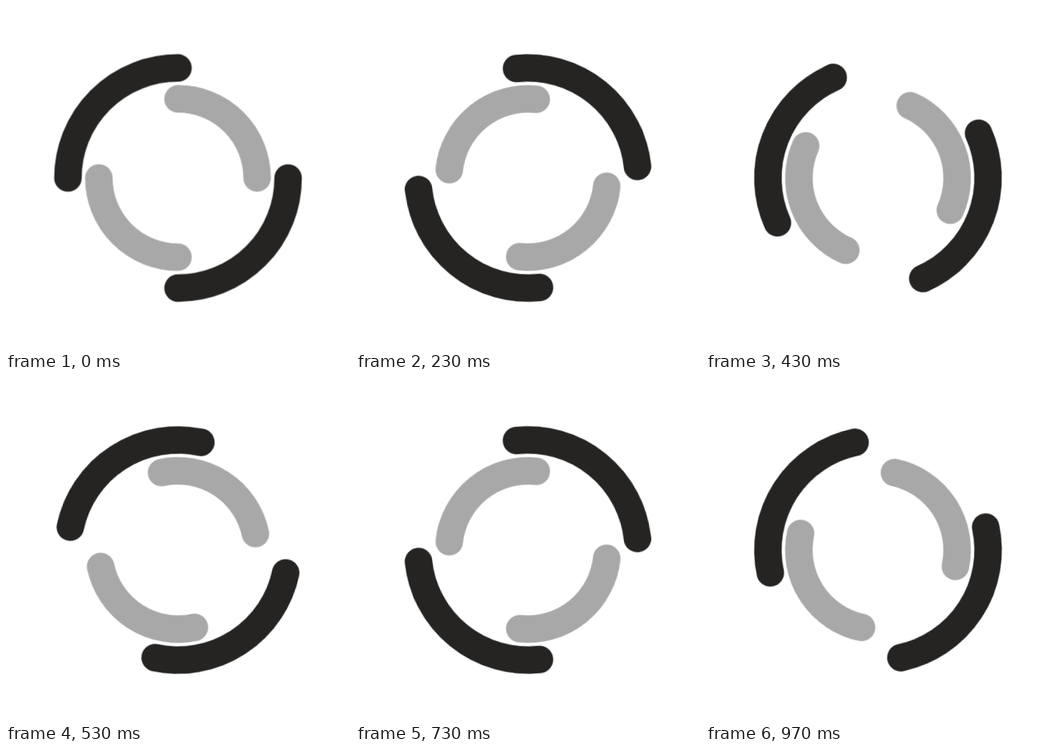
An HTML page without scripts for the animation above (1 s loop, 430 by 430 pixels).

```html
<!DOCTYPE html>
<html lang="en">
<head>
<meta charset="utf-8">
<title>Double ring spinner</title>
<style>
  html, body {
    margin: 0;
    width: 100%;
    height: 100%;
    overflow: hidden;
    background: #fff;
  }
  svg {
    display: block;
    width: 100%;
    height: 100%;
  }
  path {
    fill: none;
    stroke-width: 8;
    stroke-linecap: round;
    /* 30 poses per turn; the delay rounds each change to the nearest 10 ms */
    animation: turn 1s steps(30) -5ms infinite;
  }
  .outer { stroke: #252422; }
  .inner { stroke: #a8a8a8; animation-direction: normal; animation-name: turn-back; }
  @keyframes turn { to { transform: rotate(360deg); } }
  @keyframes turn-back { to { transform: rotate(-360deg); } }
</style>
</head>
<body>
<svg viewBox="-50 -50 100 100">
  <path class="outer" d="M32 0A32 32 0 0 1 0 32M-32 0A32 32 0 0 1 0-32"/>
  <path class="inner" d="M0-23A23 23 0 0 1 23 0M0 23A23 23 0 0 1-23 0"/>
</svg>
</body>
</html>
```
